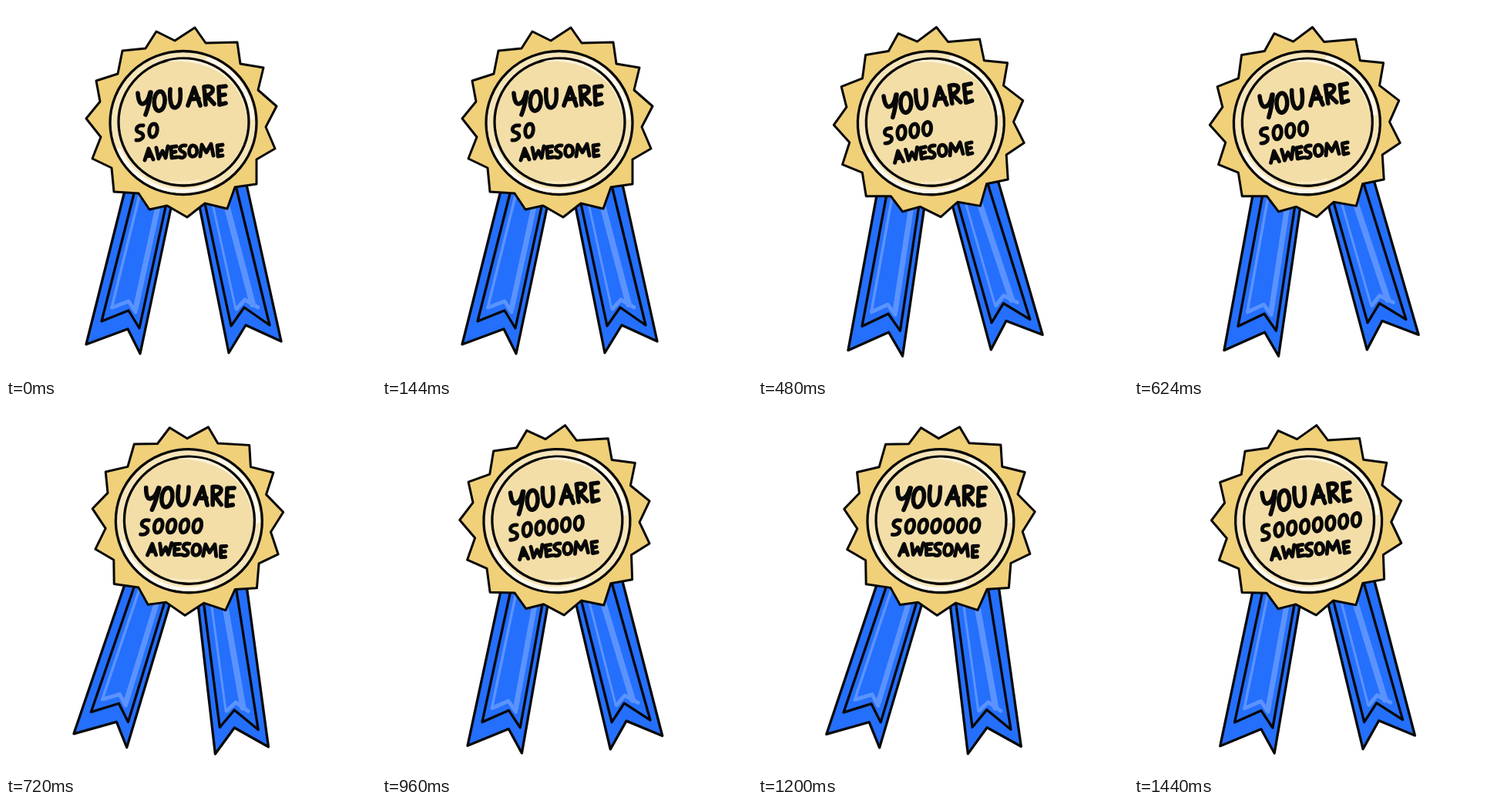
Animation of 480x480 px, one loop 1.68 s. Source, as an HTML page:

```html
<!DOCTYPE html>
<html lang="en">
<head>
<meta charset="utf-8">
<title>Award rosette</title>
<style>
  html, body { margin: 0; width: 100%; height: 100%; overflow: hidden; background: #fff; }
  svg { display: block; width: 100%; height: 100%; }
  path, ellipse { stroke-linecap: round; stroke-linejoin: round; }
  .line { stroke: #070707; stroke-width: 3.3; fill: none; }
  .blue { fill: #246ffc; }
  .shine { fill: none; stroke: #5b93fe; }
  .glint { fill: none; stroke: #fffaf0; stroke-width: 5; }
  .ink { fill: none; stroke: #070707; stroke-width: 5.6; }
  .small { stroke-width: 4.9; }
</style>
</head>
<body>
<svg viewBox="0 0 480 480" role="img" aria-label="You are so awesome">
  <g id="badge">
    <!-- left ribbon -->
    <path class="line blue" d="M164 200 104 439 158 419 174 451 214 262 226 200Z"/>
    <path class="shine" stroke-width="3.5" d="M182 210 137 392 158 383"/>
    <path class="shine" stroke-width="7" d="M206 220 168 393"/>
    <path class="shine" stroke-width="5" d="M138 391 159 383 168 397"/>
    <path class="line" d="M177 200 124 409 159 395 173 418 219 205"/>
    <!-- right ribbon -->
    <path class="line blue" d="M239 200 289 450 311 414 357 435 305 200Z"/>
    <path class="shine" stroke-width="3" d="M260 220 298 393"/>
    <path class="shine" stroke-width="8" d="M276 220 320 387"/>
    <path class="shine" stroke-width="5" d="M299 393 310 381 327 391"/>
    <path class="line" d="M246 200 292 415 309 391 342 414 290 200"/>
    <!-- medal -->
    <path class="line" style="fill:#f0d079;stroke-width:3" d="M245 28 259 48 300 47 304 75 334 80 327 109 351 130 337 157 349 185 325 199 325 231 297 235 287 263 258 256 235 274 209 259 186 264 172 243 140 241 137 210 112 198 123 170 104 146 122 124 117 97 145 88 151 58 181 55 195 33 219 45Z"/>
    <ellipse class="line" cx="230" cy="151.500" rx="95" ry="93" style="fill:#f7e6ba"/>
    <path class="glint" d="M147 187A89 88 0 0 0 268 231"/>
    <path class="glint" d="M262 69A89 88 0 0 1 319 145"/>
    <ellipse class="line" cx="230.500" cy="150.500" rx="84.500" ry="82.500" style="fill:#f3dea8"/>
    <path d="M207 72.500A82 81 0 0 1 312 145Q303 83 238 73Q222 71 207 72.500Z" fill="#fcf2d8"/>
    <path d="M213 228Q232 231 251 226" fill="none" stroke="#f9ebc8" stroke-width="2.5"/>
    <!-- YOU ARE -->
    <path class="ink" d="M171 113Q172 127 177 127Q184 126 187 112M188 112Q186 128 181 141
      M199 111C190 113 190 137 199 136C209 134 208 109 199 111
      M213 108C212 122 214 132 219 132C226 131 227 120 226 108
      M236 129 244 106 252 129M240 121 250 120
      M257 105 259 128M257 105C272 101 271 114 260 116L270 127
      M285 104 276 105 277 128 285 126M277 116 284 115"/>
    <!-- AWESOME -->
    <path class="ink small" d="M180 200 185 185 191 199M182 195 189 194
      M195 184 198 198 203 188 207 197 210 182
      M221 182 214 183 215 197 222 196M215 190 220 189
      M233 181C225 180 223 187 229 189C236 192 231 199 225 196
      M242 181C236 182 236 197 243 195C250 194 249 180 242 181
      M252 195 254 180 260 190 266 179 269 194
      M281 180 274 181 275 195 281 194M275 188 280 187"/>
    <path class="ink small" d="M178 155C168 154 167 163 173 164C182 166 178 175 169 174"/>
    <g id="os"></g>
  </g>
</svg>
<script>
const STEP = 240;
const TILT = [0, 2.2, -3.65, 4.75, -2, 4.5, -2.2]; // degrees
const badge = document.getElementById('badge');
const os = document.getElementById('os');

for (let i = 0; i < TILT.length; i++) {
  const x = 190.5 + 16.8 * i, y = 161.5 - 1.5 * i;
  os.insertAdjacentHTML('beforeend',
    `<path class="ink small" transform="translate(${x} ${y})"
      d="M1-8.500C-7-7-6 10 0 8.500C7 8 8-10 1-8.500"/>`);
}

function draw(now) {
  const n = Math.floor(now / STEP) % TILT.length;
  badge.setAttribute('transform', `rotate(${TILT[n]} 231 240)`);
  [...os.children].forEach((o, i) => o.setAttribute('visibility', i <= n ? 'visible' : 'hidden'));
}

const start = performance.now();
function tick() {
  draw(performance.now() - start);
  requestAnimationFrame(tick);
}
tick();
</script>
</body>
</html>
```
